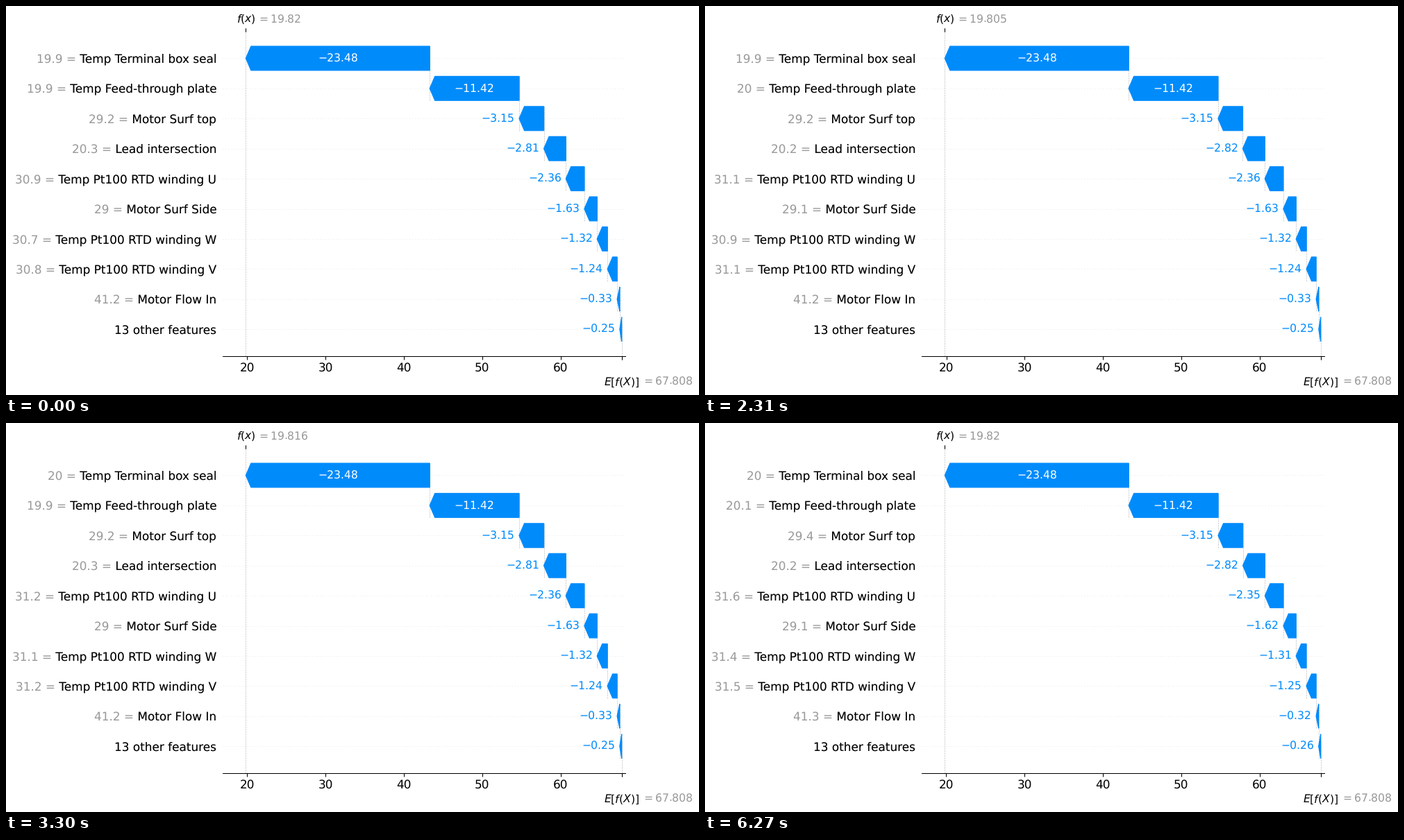
A matplotlib script for the animation above (6.6 s loop, 998 by 561 pixels).

```python
import numpy as np
import matplotlib.pyplot as plt
from matplotlib.animation import FuncAnimation
from matplotlib.transforms import ScaledTranslation

plt.rcParams["text.hinting"] = "none"

W, H, DPI = 998, 561, 93.5
FRAMES, INTERVAL = 20, 330
BASE = 67.808
BLUE, GREY, LINE = "#008bfb", "#999999", "#bbbbbb"
AX_W, AX_H, AX_BOTTOM = 579.7, 468, 56.2
BAR = 0.8
DROP = 0.5  # points by which row text sits below its row's centre


def trend(*points):
    """A quantity that moves straight from one key point to the next."""
    steps, values = zip(*points)
    return lambda i: np.interp(i, steps, values)


def wave(level, swing, period, peak, drift=0):
    """A slow oscillation around a level that may drift."""
    return lambda i: (level + drift * i
                      + swing * np.cos(2 * np.pi * (i - peak) / period))


output = trend((0, 19.82), (3, 19.801), (7, 19.805), (8, 19.807),
               (10, 19.816), (13, 19.805), (19, 19.82))
settle = trend((13, 0), (19, 1))

# Name, sensor reading over time, effect at the start and at the end.
FEATURES = [
    ("Temp Terminal box seal", wave(19.95, 0.04, 7.8, 3), 23.48, 23.48),
    ("Temp Feed-through plate", wave(19.92, 0.06, 6, 7.2, 0.005), 11.42, 11.42),
    ("Motor Surf top",
     trend((7, 29.2), (8, 29), (9, 29.2), (13, 29.2), (19, 29.4)), 3.15, 3.15),
    ("Lead intersection",
     trend((0, 20.3), (3, 20.2), (8, 20.2), (10, 20.3), (13, 20.2)), None, None),
    ("Temp Pt100 RTD winding U",
     trend((0, 30.9), (8, 31.14), (13, 31.37), (19, 31.6)), 2.36, 2.354),
    ("Motor Surf Side",
     trend((0, 29), (3, 29.1), (7, 29.1), (8, 29), (10, 29), (13, 29.1)),
     1.63, 1.62),
    ("Temp Pt100 RTD winding W",
     trend((0, 30.7), (7, 30.94), (10, 31.08), (13, 31.13), (19, 31.4)),
     1.32, 1.31),
    ("Temp Pt100 RTD winding V", trend((0, 30.82), (19, 31.523)), 1.24, 1.25),
    ("Motor Flow In", trend((13, 41.2), (19, 41.3)), 0.33, 0.32),
]
ROWS = len(FEATURES) + 1

fig = plt.figure(figsize=(10.6738, 6), dpi=DPI, facecolor="white")


def short(value):
    return f"{value:.3f}".rstrip("0").rstrip(".")


def state(i):
    """Labels and bar lengths from top to bottom, and the model output."""
    fx = output(i)
    labels, sizes = [], []
    for name, reading, start, end in FEATURES:
        value = round(float(reading(i)), 1)
        labels.append(f"{value:g} = {name}")
        if start is None:
            sizes.append(2.82 - 0.1 * (value - 20.2))
        else:
            sizes.append(start + (end - start) * settle(i))
    labels.append("13 other features")
    sizes.append(BASE - fx - sum(sizes))
    return labels, sizes, fx


def nudge(label, dx, dy=0):
    shift = ScaledTranslation(dx / 72, dy / 72, fig.dpi_scale_trans)
    label.set_transform(label.get_transform() + shift)


def edge_ticks(ax, x, labels, shifts):
    """A black symbol and its grey value, side by side at one tick."""
    ax.set_xticks([x, x + 1e-8], labels, fontsize=12, ha="left")
    symbol, value = ax.xaxis.get_majorticklabels()
    nudge(symbol, *shifts[0])
    nudge(value, *shifts[1])
    value.set_color(GREY)


def draw_bars(ax, sizes, fx, inch):
    head = 0.08 * inch
    left = fx
    for k, size in enumerate(sizes):
        y = ROWS - 1 - k
        right = left + size
        ax.arrow(right, y, -max(size - head, 1e-6), 0, color=BLUE, width=BAR,
                 head_width=BAR, head_length=min(size, head))
        if size > 6:
            x, color, ha = left + size / 2, "white", "center"
        else:
            x, color, ha = left - 5 / 72 * inch, BLUE, "right"
        text = ax.text(x, y, f"\u2212{size:.2f}", color=color, fontsize=12,
                       ha=ha, va="center")
        nudge(text, 0, -DROP)
        if y:
            ax.plot([right, right], [y - 1 - BAR / 2, y + BAR / 2], color=LINE,
                    ls="--", lw=0.5, zorder=-1)
        left = right


def draw(i):
    fig.clear()
    labels, sizes, fx = state(i)

    # The axes slide left when the widest row label loses its decimal.
    widest = next(s for s in labels if s.endswith("W"))
    left = 312.4 if "." in widest else 308.0
    ax = fig.add_axes([left / W, AX_BOTTOM / H, AX_W / W, AX_H / H])
    ax_base = ax.twiny()
    ax_out = ax_base.twiny()

    span = BASE - fx
    xlim = fx - 0.061 * span, BASE + 0.01 * span
    for a in (ax, ax_base, ax_out):
        a.set_xlim(*xlim)
        a.set_ylim(-0.89, ROWS - 0.11)
        a.spines[["left", "right", "top"]].set_visible(False)
    for a in (ax_base, ax_out):
        a.spines["bottom"].set_visible(False)

    draw_bars(ax, sizes, fx, (xlim[1] - xlim[0]) * DPI / AX_W)
    for y in range(ROWS):
        ax.axhline(y, color="#cccccc", lw=0.5, dashes=(1, 5), zorder=-1)
    dash = dict(color=LINE, ls="--", lw=0.5, zorder=-1)
    ax.axvline(BASE, 0, 1 / ROWS, **dash)
    ax.axvline(fx, 0, 1, **dash)

    ax.set_xticks(range(20, 61, 10))
    ax.tick_params(axis="x", labelsize=13)
    rows = labels[::-1]
    names = [s.split("=")[-1] for s in rows]
    ax.set_yticks([*range(ROWS), *(y + 1e-8 for y in range(ROWS))],
                  rows + names, fontsize=13)
    ax.yaxis.set_ticks_position("none")
    for k, label in enumerate(ax.yaxis.get_majorticklabels()):
        nudge(label, 0, -DROP)
        if k < ROWS:
            label.set_color(GREY)

    edge_ticks(ax_base, BASE, ["\n$E[f(X)]$", f"\n$ = {short(BASE)}$"],
               [(-20, -0.9), (22, -1.9)])
    edge_ticks(ax_out, fx, ["$f(x)$", f"$ = {short(fx)}$"],
               [(-10, 0), (12, 0)])
    return []


anim = FuncAnimation(fig, draw, frames=FRAMES, interval=INTERVAL,
                     init_func=lambda: draw(0), repeat=True, repeat_delay=0)
plt.show()
```
